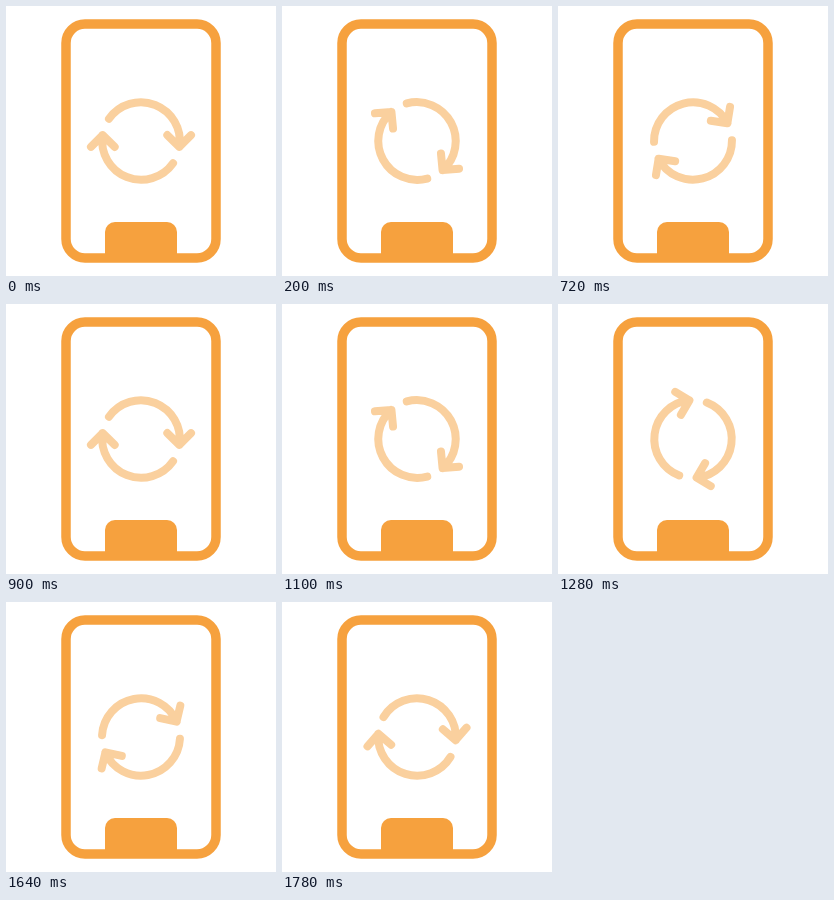
Write an HTML page that moves like this. It is 270 px wide and 270 px high and loops after 1800 ms.

```html
<!DOCTYPE html>
<html lang="en">
<head>
<meta charset="utf-8">
<title>Phone refresh</title>
<style>
  html, body { margin: 0; width: 100%; height: 100%; overflow: hidden; background: #fff; }
  svg { display: block; width: 100%; height: 100%; }
</style>
</head>
<body>
<svg viewBox="0 0 270 270">
  <rect x="60" y="18" width="150" height="234" rx="19" fill="none" stroke="#f6a13e" stroke-width="9.5"/>
  <path d="M99 250V226a10 10 0 0 1 10-10H161a10 10 0 0 1 10 10V250Z" fill="#f6a13e"/>
  <g id="arrows" fill="none" stroke="#fad09e" stroke-width="8" stroke-linecap="round" stroke-linejoin="round">
    <!-- Arc and arrowhead around the origin; the second is a half turn of the first -->
    <path id="arrow" d="M-32.1 -22.1A39 39 0 0 1 38.5 5.5M26.3 -6L38.3 5.7L50 -6"/>
    <use href="#arrow" transform="rotate(180)"/>
  </g>
</svg>
<script>
  const LOOP = 1800;
  const arrows = document.getElementById('arrows');
  const start = performance.now();

  function draw() {
    const angle = (performance.now() - start) % LOOP / LOOP * 360;
    arrows.setAttribute('transform', `translate(135 135) rotate(${angle})`);
    requestAnimationFrame(draw);
  }
  draw();
</script>
</body>
</html>
```
